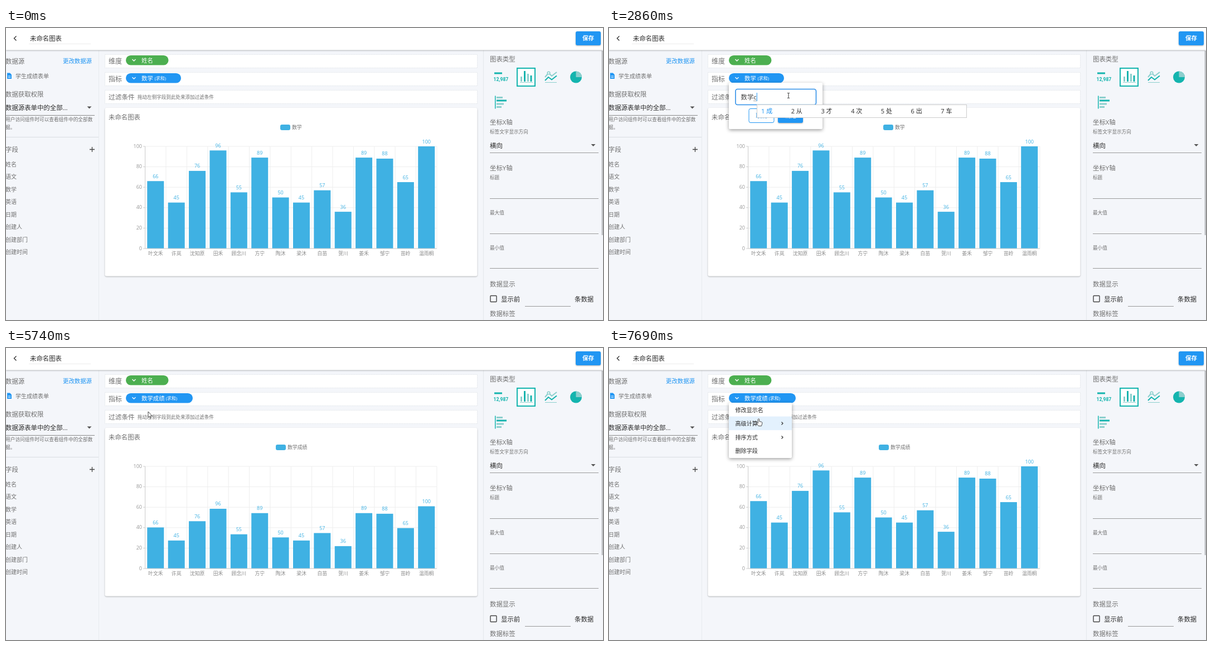
An HTML page for the animation above (8 s loop, 1071x523 px).

```html
<!DOCTYPE html>
<html lang="zh-CN">
<head>
<meta charset="utf-8">
<title>未命名图表</title>
<style>
html, body { margin: 0; width: 100%; height: 100%; overflow: hidden; background: #f4f6fa; }
svg { display: block; width: 100%; height: 100%; font-family: 'Open Sans', 'Noto Sans CJK SC', 'Noto Sans CJK', sans-serif; }
text { white-space: pre; }
.card { filter: drop-shadow(0 1px 1px rgba(0,0,0,.28)); }
.pop { filter: drop-shadow(0 2px 3px rgba(0,0,0,.38)); }
.btn { filter: drop-shadow(0 1px 1px rgba(0,0,0,.3)); }
</style>
</head>
<body>
<svg id="stage" viewBox="0 0 1071 523" preserveAspectRatio="none"></svg>
<script>
const LOOP = 8000;
const BLUE = '#2196f3', BAR = '#3fb1e3', TEAL = '#14b4ae', PALE = '#8ccfcd';
const GREY = '#707070', DARK = '#2c2c2c';
const names = ['叶文禾', '许岚', '沈知原', '田禾', '顾念川', '方宁', '陶沐', '梁沐', '白苗', '贺川', '姜禾', '邹宁', '苗岭', '温雨桐'];
const scores = [66, 45, 76, 96, 55, 89, 50, 45, 57, 36, 89, 88, 65, 100];
const AXIS_X = 249.6, AXIS_Y = 395, BAND = 37.38, UNIT = 1.83;

const svg = document.getElementById('stage');
const $ = id => document.getElementById(id);

// y is the vertical centre of the glyphs
const text = (x, y, s, size = 11.4, fill = GREY, extra = '') =>
  `<text x="${x}" y="${y + size * .37}" font-size="${size}" fill="${fill}" ${extra}>${s}</text>`;
const mid = (x, y, s, size, fill, extra = '') => text(x, y, s, size, fill, 'text-anchor="middle" ' + extra);
const rect = (x, y, x2, y2, fill, extra = '') =>
  `<rect x="${x}" y="${y}" width="${x2 - x}" height="${y2 - y}" fill="${fill}" ${extra}/>`;
const path = (d, stroke, w = 1, extra = '') =>
  `<path d="${d}" fill="none" stroke="${stroke}" stroke-width="${w}" ${extra}/>`;
const hline = (x, x2, y, c = '#9a9a9a') => path(`M${x} ${y}H${x2}`, c);
const drop = (x, y) => `<path d="M${x - 4} ${y - 2}h8l-4 4z" fill="#555"/>`;
const chevron = (x, y) => path(`M${x - 3} ${y - 1.5}l3 3l3-3`, '#fff', 1.3);
const bold = 'font-weight="500"';

function header() {
  return rect(0, 0, 1071, 39.5, '#fff', 'class="card"') +
    path('M18.5 14.5l-4 4l4 4', '#333', 1.4) +
    text(43, 18.5, '未命名图表', 11.4, DARK) + hline(41, 152, 28.5, '#ececec') +
    rect(1022, 6, 1067, 31, BLUE, 'rx="3" class="btn"') + mid(1044.5, 18.5, '保存', 10.4, '#fff', 'font-weight="700"');
}

function leftPanel() {
  const fields = ['姓名', '语文', '数学', '英语', '日期', '创建人', '创建部门', '创建时间'];
  return path('M166.5 40V523', '#e8ebef') +
    text(-1, 60, '数据源') + text(102, 59.5, '更改数据源', 10.4, BLUE) +
    `<path d="M2 80.5h5l3 3v7.5h-8z" fill="${BLUE}"/>` + path('M3.5 86h5M3.5 88.5h5', '#fff', .9) +
    text(17, 86.5, '学生成绩表单', 10) + text(-1, 119, '数据获取权限') +
    text(-1, 142.5, '数据源表单中的全部...', 11.4, DARK) + drop(149.5, 142.5) + hline(0, 159, 156.5, '#888') +
    text(-1, 163.5, '用户访问组件时可以查看组件中的全部数', 8.7) + text(-1, 177.5, '据。', 8.7) +
    hline(0, 166, 195.5, '#d9dde2') + text(-1, 218, '字段') +
    path('M150 217.5h9M154.5 213v9', '#444', 1.3) +
    fields.map((f, i) => text(-1, 244 + i * 22.53, f, 10)).join('');
}

function chartIcons() {
  return rect(876, 79.5, 890, 82.5, TEAL) +
    text(874.5, 92, '12,987', 8.6, TEAL, 'font-weight="700" style="font-family:Roboto,sans-serif"') +
    rect(917, 72, 949, 104, '#fff', `stroke="${TEAL}" stroke-width="2"`) +
    rect(923, 87, 926, 96, PALE) + rect(929, 77, 932, 96, TEAL) +
    rect(935, 82, 938, 96, PALE) + rect(940.5, 85, 943.5, 96, TEAL) + hline(922, 945, 97.5, PALE) +
    path('M967 88l5-6M975 82l4 4l9-7', PALE, 2) +
    `<circle cx="973.5" cy="80.5" r="2.3" fill="none" stroke="${PALE}" stroke-width="1.5"/>` +
    path('M967 94l6-6l6 4.5l9-7', TEAL, 2) + hline(967, 988, 97.5, PALE) +
    `<circle cx="1022.5" cy="88" r="10.5" fill="${TEAL}"/><path d="M1022.5 88v-10.5a10.5 10.5 0 0 1 10.5 10.5z" fill="${PALE}"/>` +
    rect(877, 121.5, 878.5, 144.5, TEAL) + rect(880, 123, 891, 126, PALE) + rect(880, 128.5, 898, 131.5, TEAL) +
    rect(880, 134.5, 893, 137.5, PALE) + rect(880, 140, 889, 143, PALE);
}

function rightPanel() {
  const x = 868;
  return path('M856.5 40V523', '#e4e7eb') + text(x, 55.5, '图表类型') + chartIcons() +
    text(x, 169, '坐标X轴') + text(x, 186, '标签文字显示方向', 8.6) +
    text(x, 210.5, '横向', 11.4, DARK) + drop(1053.5, 210) + hline(x, 1063, 223.5) +
    text(x, 251, '坐标Y轴') + text(x, 268, '标题', 8.6) + hline(x, 1063, 305.5) +
    text(x, 330.5, '最大值', 8.6) + hline(x, 1063, 368.5) +
    text(x, 393.5, '最小值', 8.6) + hline(x, 1063, 430.5) + text(x, 458.5, '数据显示') +
    rect(869, 479.5, 880, 490.5, 'none', 'rx="1" stroke="#444" stroke-width="1.4"') +
    text(888, 485.5, '显示前', 11.4, DARK) + hline(931, 1013, 498.5) + text(1020, 485.5, '条数据', 11.4, DARK) +
    text(x, 512, '数据标签') + rect(1068.5, 41, 1071, 371, '#bfc1c4');
}

function rows() {
  const row = y => rect(177.5, y + .5, 845.5, y + 24.5, '#fff', 'stroke="#e3e6ea" stroke-dasharray="2 1"');
  return row(47) + row(79) + row(111) +
    text(184, 59.5, '维度', 12) + text(184, 91.5, '指标', 12) + text(184, 124, '过滤条件', 11.7) +
    text(236, 124, '拖动左侧字段到此处来添加过滤条件', 8.55) +
    rect(215, 49, 291.5, 66.5, '#4caf50', 'rx="8.7"') + chevron(229.5, 57.5) + text(243, 57.7, '姓名', 10.4, '#fff', bold) +
    rect(215, 81, 314, 98.5, BLUE, 'rx="8.7" id="pill"') + '<circle id="ripple" cx="229.5" cy="89.7" r="9" fill="#fff"/>' +
    chevron(229.5, 89.7) + text(243, 90, '数学', 10.4, '#fff', bold + ' id="measure"') +
    text(266.5, 90, '(求和)', 8, '#fff', bold + ' id="sum"') +
    `<g id="cross">${path('M-3.5-3.5l7 7M3.5-3.5l-7 7', '#fff', 1.3)}</g>`;
}

function chart() {
  let s = rect(177.5, 143, 845.5, 444.5, '#fff', 'rx="3" class="card"') + text(184, 160, '未命名图表');
  s += `<g id="legend">${rect(0, 173, 18, 183, BAR, 'rx="3"')}${text(21, 178, '数学', 8.9, GREY, 'id="series"')}</g>`;
  const right = AXIS_X + BAND * 14;
  for (let v = 0; v <= 100; v += 20) {
    const y = AXIS_Y - v * UNIT;
    s += hline(AXIS_X, right, y, '#eee') + hline(AXIS_X - 3.5, AXIS_X, y, '#ccc') +
      text(244, y - .7, v, 9, '#999', 'text-anchor="end"');
  }
  for (let i = 0; i < 15; i++) s += path(`M${AXIS_X + i * BAND} 212V${AXIS_Y}`, '#eee');
  scores.forEach((v, i) => {
    const x = AXIS_X + (i + .5) * BAND;
    s += `<rect id="bar${i}" x="${x - 15}" width="30" fill="${BAR}"/>` +
      mid(x, 0, v, 9, BAR, `id="val${i}"`) + mid(x, 404, names[i], 8.8, '#888');
  });
  return s + path(`M${AXIS_X} 212V${AXIS_Y}H${right}`, '#ccc');
}

function popups() {
  const items = ['修改显示名', '高级计算', '排序方式', '删除字段'];
  const arrow = y => path(`M309.5 ${y - 2.5}l2.5 2.5l-2.5 2.5`, '#333', 1.2);
  return `<g id="menu">${rect(215, 98, 328, 197, '#fff', 'rx="2" class="pop"')}` +
    rect(215, 0, 328, 24.6, '#e3f1fd', 'id="hover"') +
    items.map((s, i) => text(226.5, 111 + i * 24.5, s, 10.1, DARK)).join('') + arrow(135) + arrow(160) + '</g>' +
    `<g id="dialog">${rect(215, 98, 383, 181, '#fff', 'rx="2" class="pop"')}` +
    rect(227, 109.5, 371.5, 137.5, '#fff', 'rx="3.5" id="field"') + text(236.5, 124, '', 11.4, '#444', 'id="typed"') +
    path('M0 0', '#444', 1, 'id="under" stroke-dasharray="1 1"') + path('M0 0', BLUE, 1, 'id="caret"') +
    rect(251, 144.5, 296, 169.5, '#fff', `rx="3" stroke="${BLUE}"`) + mid(273.5, 157, '取消', 10.3, BLUE) +
    rect(303, 144.5, 348, 170, BLUE, 'rx="3" class="btn"') + mid(325.5, 157, '确定', 10.3, '#fff', bold) + '</g>' +
    '<g id="ime"></g>' +
    `<g id="status">${rect(-3, 512, 352, 526, '#dee1e6', 'rx="2"')}${text(-4, 520.5, '正在连接...', 8.6, '#444')}</g>`;
}

function pointer() {
  const ink = 'fill="#fff" stroke="#333" stroke-width=".9" stroke-linejoin="round"';
  return `<g id="cursor"><circle id="click" r="9" cy="1" fill="#f2dd4c" opacity=".8"/>` +
    `<path id="arrow" ${ink} d="M0 0v10.5l2.4-2.2l1.6 3.7l1.6-.7l-1.6-3.6h3.3z"/>` +
    `<path id="hand" ${ink} d="M-1.2 1q1.2-1.8 2.4 0v4l4 .9q1.3.4 1.2 1.8l-.7 3.3l-.8 2.2h-5.2l-3.4-4.8q-.3-1.5 1-1.3l1.5 1.3z"/>` +
    '<path id="beam" fill="none" stroke="#333" d="M-2-4.5h1.5l.5.5l.5-.5h1.5M0-4v8M-2 4.5h1.5l.5-.5l.5.5h1.5"/></g>';
}

svg.innerHTML = rect(0, 0, 1071, 523, '#f4f6fa') + leftPanel() + rightPanel() + rows() + chart() + header() + popups() + pointer();

// time, x, y, shape used until the next stop
const stops = [
  [70, 925, 476, 'arrow'], [740, 228, 87, 'hand'], [790, 226, 84, 'hand'], [1130, 226, 84, 'hand'],
  [1480, 262, 106, 'hand'], [1700, 266, 108, 'hand'], [1830, 312, 115, 'beam'], [2050, 312, 115, 'beam'],
  [2400, 322, 121, 'beam'], [4550, 322, 121, 'beam'], [4760, 324, 145, 'hand'], [4950, 325, 155, 'hand'],
  [5480, 325, 155, 'arrow'], [5740, 255, 114, 'arrow'], [6050, 228, 93, 'hand'], [6250, 226.5, 89, 'hand'],
  [6640, 226.5, 89, 'arrow'], [6980, 226.5, 89, 'arrow'], [7180, 233, 102, 'hand'], [7640, 268.5, 126.5, 'hand']
];
const clicks = [920, 1600, 2200, 5150, 6560];
const typing = [[2860, 'c'], [3110, 'ch'], [3170, 'che'], [3320, 'chen'], [3550, "cheng'j"], [3640, "cheng'ji"]];
const single = ['成', '从', '才', '次', '处', '出', '车'];
const double = ['成绩', '乘机', '承接', '成计', '城际', '成吉', '程级'];

const clamp = v => Math.max(0, Math.min(1, v));
const ramp = (t, from, ms) => clamp((t - from) / ms);
const between = (t, a, b) => t >= a && t < b;
const show = (id, on) => { $(id).style.display = on ? '' : 'none'; };
const set = (id, attrs) => { for (const k in attrs) $(id).setAttribute(k, attrs[k]); };

function cursorAt(t) {
  let i = stops.length - 1;
  while (i > 0 && stops[i][0] > t) i--;
  const a = stops[i], b = stops[i + 1] || a;
  const p = a === b ? 0 : ramp(t, a[0], b[0] - a[0]);
  const e = p * p * (3 - 2 * p);
  return { x: a[1] + (b[1] - a[1]) * e, y: a[2] + (b[2] - a[2]) * e, kind: a[3] };
}

function drawCursor(t, c) {
  show('cursor', t >= 70);
  set('cursor', { transform: `translate(${c.x} ${c.y})` });
  for (const k of ['arrow', 'hand', 'beam']) show(k, k === c.kind);
  show('click', clicks.some(s => between(t, s, s + 100)));
}

function drawPill(t) {
  const renamed = t >= 5240, w = renamed ? 120 : 99;
  $('measure').textContent = renamed ? '数学成绩' : '数学';
  set('pill', { width: w });
  set('sum', { x: renamed ? 286.5 : 266.5 });
  set('cross', { transform: `translate(${215 + w - 13.5} 89.7)` });
  show('cross', between(t, 760, 1080) || between(t, 6120, 6640));
  const since = t - (t < 4000 ? 1020 : 6640);
  set('ripple', { opacity: between(since, 0, 350) ? .35 * (1 - since / 350) + .05 : 0 });
}

function drawChart(t) {
  const renamed = t >= 5570;
  const grow = renamed ? 1 - (1 - ramp(t, 5472, 1000)) ** 3 : 1;
  scores.forEach((v, i) => {
    const h = v * UNIT * grow;
    set('bar' + i, { y: AXIS_Y - h, height: h });
    set('val' + i, { y: AXIS_Y - h - 5.5 });
  });
  $('series').textContent = renamed ? '数学成绩' : '数学';
  set('legend', { transform: `translate(${renamed ? 484 : 492} 0)` });
}

function drawMenu(t, c) {
  const p = ramp(t, t < 4000 ? 1080 : 6680, 200);
  const fade = t < 4000 ? 1 - ramp(t, 1710, 70) : 1;
  const e = 1 - (1 - p) ** 2, sx = .77 + .23 * e, sy = .58 + .42 * e;
  show('menu', p * fade > 0);
  set('menu', { opacity: p * fade, transform: `translate(215 98) scale(${sx} ${sy}) translate(-215 -98)` });
  const item = Math.floor((c.y - 98) / 24.6);
  show('hover', p === 1 && item >= 0 && item < 4);
  set('hover', { y: 98 + item * 24.6 });
  show('status', between(t, 1080, 1640) || between(t, 6600, 7160));
}

function drawDialog(t) {
  const p = ramp(t, 1750, 80) * (1 - ramp(t, 5180, 80)), focus = t >= 2200;
  show('dialog', p > 0);
  set('dialog', { opacity: p });
  set('field', { stroke: focus ? '#2f8fe8' : '#555', 'stroke-width': focus ? 1.6 : 1 });
  const step = typing.filter(s => t >= s[0]).pop();
  const composing = step && t < 3730 ? step[1] : '';
  $('typed').textContent = '数学' + (t >= 3730 ? '成绩' : composing);
  const end = p > 0 ? 236.5 + $('typed').getComputedTextLength() : 0;
  set('under', { d: composing ? `M259.5 130.5H${end}` : 'M0 0' });
  set('caret', { d: `M${end + .6} 116V131` });
  show('caret', focus && !between(t, 4290, 4820));
  drawIme(composing);
}

function drawIme(s) {
  const key = s.length > 4 ? 'long' : s.length > 1 ? 'mid' : s;
  const g = $('ime');
  if (g.dataset.key === key) return;
  g.dataset.key = key;
  if (!key) { g.innerHTML = ''; return; }
  const words = key === 'long' ? double : single;
  const right = { long: 767, mid: 646, c: 642 }[key];
  const gap = (right - 266) / words.length;
  g.innerHTML = rect(265.5, 137.5, right - .5, 160.5, '#fff', 'stroke="#ccc"') +
    words.map((w, i) => text(273 + i * gap, 149, `${i + 1} ${w}`, 11, i ? DARK : BLUE)).join('');
}

function render(t) {
  const c = cursorAt(t);
  drawCursor(t, c);
  drawPill(t);
  drawChart(t);
  drawMenu(t, c);
  drawDialog(t);
}

const start = performance.now();
function frame() {
  render((performance.now() - start) % LOOP);
  requestAnimationFrame(frame);
}
frame();
</script>
</body>
</html>
```
